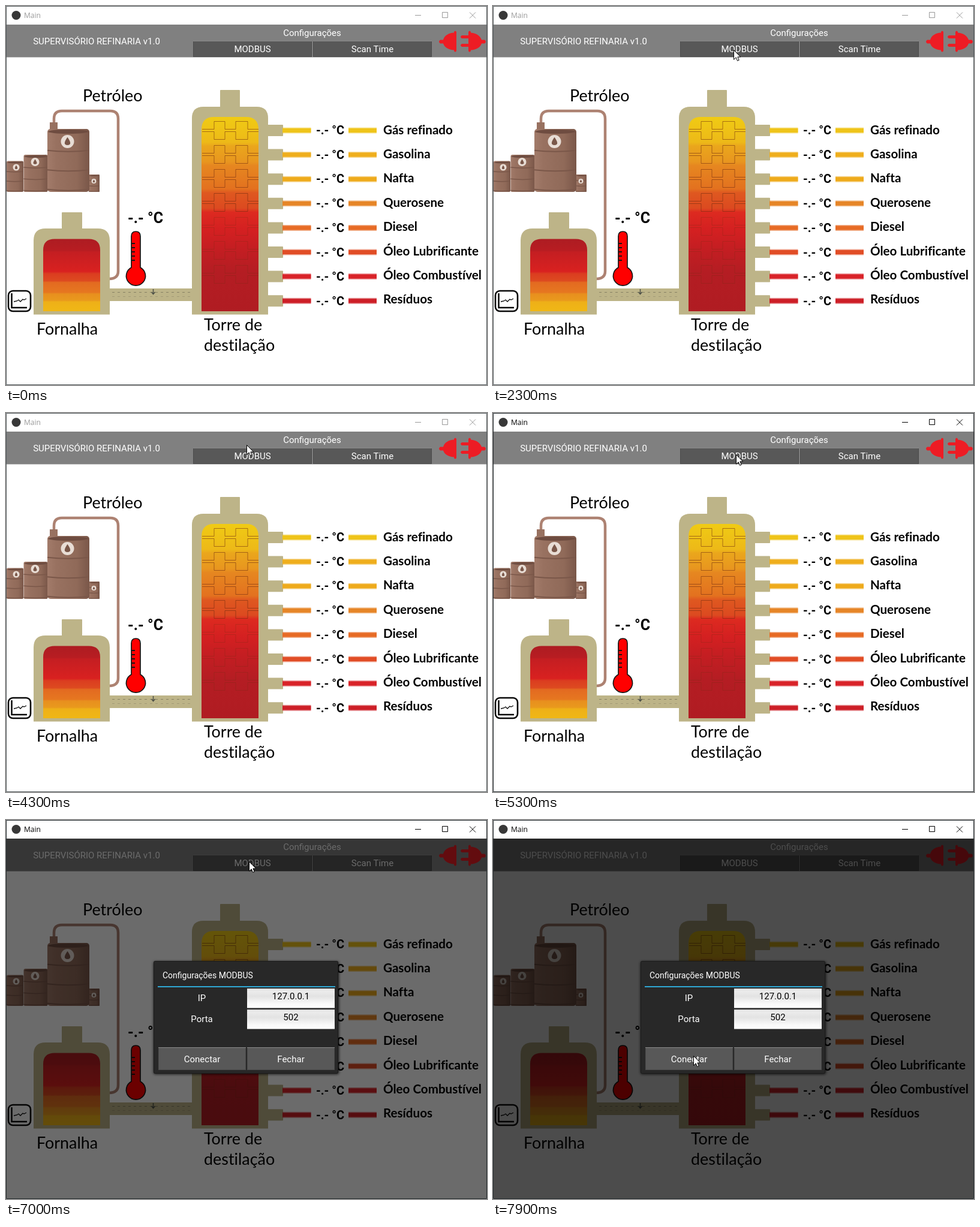
Recreate the animation shown at these times as an HTML page. Size 802x632 px, loop 8 s.

```html
<!DOCTYPE html>
<html lang="pt">
<head>
<meta charset="utf-8">
<title>Main</title>
<style>
  html, body { margin: 0; width: 100%; height: 100%; overflow: hidden; background: #fff; }
  svg { display: block; width: 802px; height: 632px; }
  .ui { font: 15px Roboto, sans-serif; fill: #fff; text-anchor: middle; }
  .caption { font: 26.9px Lato, sans-serif; font-variant-ligatures: none; }
  .product { font: bold 20.6px Lato, sans-serif; font-variant-ligatures: none; }
  .temp { font: bold 20px Roboto, sans-serif; }
</style>
</head>
<body>
<svg viewBox="0 0 802 632">
  <defs>
    <linearGradient id="towerHeat" x1="0" y1="0" x2="0" y2="1">
      <stop offset="0" stop-color="#f0cb14"/><stop offset=".13" stop-color="#edb918"/>
      <stop offset=".15" stop-color="#eaa61c"/><stop offset=".23" stop-color="#e8961f"/>
      <stop offset=".25" stop-color="#e68720"/><stop offset=".37" stop-color="#e3711f"/>
      <stop offset=".39" stop-color="#df5820"/><stop offset=".47" stop-color="#dc4a20"/>
      <stop offset=".49" stop-color="#dd2a20"/><stop offset=".58" stop-color="#d42021"/>
      <stop offset=".67" stop-color="#c51e22"/><stop offset=".8" stop-color="#b41d23"/>
      <stop offset="1" stop-color="#b01c22"/>
    </linearGradient>
    <linearGradient id="furnaceHeat" x1="0" y1="0" x2="0" y2="1">
      <stop offset="0" stop-color="#ad1c22"/><stop offset=".16" stop-color="#b81d22"/>
      <stop offset=".18" stop-color="#c41e22"/><stop offset=".45" stop-color="#d92120"/>
      <stop offset=".48" stop-color="#db3d20"/><stop offset=".58" stop-color="#dd4a20"/>
      <stop offset=".6" stop-color="#e36a21"/><stop offset=".74" stop-color="#e67720"/>
      <stop offset=".76" stop-color="#e88f1e"/><stop offset=".85" stop-color="#e9991d"/>
      <stop offset=".87" stop-color="#eeb018"/><stop offset="1" stop-color="#f0b715"/>
    </linearGradient>
    <linearGradient id="steel">
      <stop offset="0" stop-color="#a27b6a"/><stop offset=".22" stop-color="#987160"/>
      <stop offset=".7" stop-color="#906a59"/><stop offset="1" stop-color="#7a5749"/>
    </linearGradient>
    <linearGradient id="field" x1="0" y1="0" x2="0" y2="1">
      <stop offset="0" stop-color="#d9d9d9"/><stop offset=".12" stop-color="#ececec"/>
      <stop offset=".4" stop-color="#e3e3e3"/><stop offset=".8" stop-color="#fafafa"/>
      <stop offset="1" stop-color="#fff"/>
    </linearGradient>
    <filter id="shadow" x="-10%" y="-10%" width="120%" height="120%"><feGaussianBlur stdDeviation="2"/></filter>
  </defs>

  <rect width="802" height="632" fill="#fff"/>
  <circle cx="17" cy="15.5" r="7.5" fill="#383838"/>
  <g id="titleBar">
    <text x="30" y="20" style="font:12px 'Open Sans',sans-serif" fill="currentColor">Main</text>
    <path d="M682 15.5h10M727.5 10.5h9v9h-9zM773 10.5l10 10M783 10.5l-10 10" fill="none" stroke="currentColor"/>
  </g>

  <rect x="1" y="31" width="800" height="54.5" fill="#808080"/>
  <g class="ui">
    <text x="151" y="64">SUPERVISÓRIO REFINARIA v1.0</text>
    <text x="510.500" y="50">Configurações</text>
    <g id="menu"></g>
  </g>
  <g fill="#ed1c24">
    <path d="M724 56.500h5C731 49 738 45 747 44.500V43q2-3 4 0v32q-2 3-4 0V73.500C738 73 731 69 729 62.500h-5q-4-3 0-6z"/>
    <path d="M771 43q2-3 4 0v1.500C784 45 791 50 793 56.500h5q4 3 0 6h-5C791 69 784 73 775 73.500V75q-2 3-4 0v-7h-11q-4-2.500 0-5h11v-9h-11q-4-2.500 0-5h11z"/>
  </g>

  <path d="M80 200V188Q80 175 93 175H174Q187 175 187 188V442Q187 455 172 455" fill="none" stroke="#ad8272" stroke-width="4.500"/>
  <path d="M73 194h13v13h-13z" fill="#987160"/>
  <g id="barrels"></g>

  <g fill="#bdb488">
    <path d="M173 471H311V492H173z"/>
    <path d="M93 345q0-1 1-1h32q1 0 1 1V371H153Q173 371 173 391V514.500H46V391Q46 371 66 371H93z"/>
    <path d="M357 141q0-1 1-1h31q1 0 1 1V168H418Q437 168 437 187V514.500H310V187Q310 168 329 168H357z"/>
    <g id="nozzles"></g>
  </g>
  <path d="M62 509V407Q62 388.500 81 388.500H138Q157 388.500 157 407V509z" fill="url(#furnaceHeat)"/>
  <path d="M326 509V206Q326 185 347 185H400Q421 185 421 206V509z" fill="url(#towerHeat)"/>
  <g id="trays" fill="none" stroke="#702b10"></g>
  <path d="M177 477.500H308" stroke="#716c55" stroke-dasharray="4 5" opacity=".7"/>
  <path d="M177 484.500H308" stroke="#716c55" stroke-dasharray="4 5" opacity=".35"/>
  <path d="M245.500 472v8M242.500 477l3 3.500l3-3.500" stroke="#4e5148" stroke-width="1.500" fill="none"/>

  <g id="pipes"></g>
  <g class="caption">
    <text x="128" y="158.500">Petróleo</text>
    <text x="51" y="548">Fornalha</text>
    <text x="330" y="541">Torre de</text>
    <text x="330" y="575">destilação</text>
  </g>
  <text class="temp" x="203" y="362" style="font-size:25px">-.- °C</text>

  <path d="M209 436V384Q209 376 216.500 376T224 384V436A16 16 0 1 1 209 436z" fill="#f00" stroke="#151515" stroke-width="1.700"/>
  <path d="M209 396h6M209 403h6M209 410h6M209 417h6M209 424h6" stroke="#151515" stroke-width="2"/>
  <g fill="none" stroke="#080808">
    <rect x="4" y="475" width="37" height="34" rx="7.500" stroke-width="2.600"/>
    <path d="M9.500 479V503H35" stroke-width="2.500"/>
    <path d="M13 493l5-1l3-2l3 3l4-4l2 1l4-2" stroke-width="1.300"/>
  </g>

  <rect id="dim" x="1" y="31" width="800" height="600"/>
  <g id="popup">
    <rect x="246" y="236" width="309" height="188" rx="3" opacity=".75" filter="url(#shadow)"/>
    <rect x="246.500" y="235.500" width="307" height="187" rx="2" fill="#282828" stroke="#1b1b1b"/>
    <rect x="253" y="277" width="296" height="2" fill="#2fa7d4"/>
    <g class="ui">
      <text x="261" y="264" style="font-size:14px;text-anchor:start">Configurações MODBUS</text>
      <text x="326.500" y="302">IP</text>
      <text x="326.500" y="337">Porta</text>
      <rect x="402" y="281" width="146" height="32.500" fill="url(#field)"/>
      <rect x="402" y="316" width="146" height="32.500" fill="url(#field)"/>
      <text x="475" y="299" style="fill:#000">127.0.0.1</text>
      <text x="475" y="334" style="fill:#000">502</text>
      <g id="popupButtons"></g>
    </g>
  </g>
  <path id="frame" d="M.5 .5H801.500V631.500H.5z" fill="none"/>
  <path id="cursor" d="M.5 .5V16.300L4.200 12.800L6.600 18.400L9.200 17.300L6.900 11.900H11.700z" fill="#fff" stroke="#000"/>
</svg>
<script>
const LOOP = 8000, STEP = 100;
const el = id => document.getElementById(id);
const fill = (id, items, draw) => { el(id).innerHTML = items.map(draw).join(''); };

const button = ([label, x, y, w, h]) => `
  <rect x="${x}" y="${y}" width="${w}" height="${h}" fill="#585858"/>
  <path d="M${x} ${y + .5}h${w}" stroke="#8a8a8a"/>
  <path d="M${x + .5} ${y + h}v${1 - h}M${x + w - .5} ${y + h}v${1 - h}M${x} ${y + h - .5}h${w}" stroke="#4b4b4b"/>
  <text x="${x + w / 2}" y="${Math.round(y + h / 2 + 5.5)}">${label}</text>`;
fill('menu', [['MODBUS', 312, 58, 198, 27], ['Scan Time', 512, 58, 198, 27]], button);
fill('popupButtons', [['Conectar', 254, 379, 146, 38], ['Fechar', 402, 379, 146, 38]], button);

const barrel = ([x, y, w, cx, cy, r]) => {
  const h = 310 - y, band = k => `M${x} ${y + h * k}q${w / 2} ${w / 18} ${w} 0`;
  return `<rect x="${x}" y="${y}" width="${w}" height="${h}" rx="${w / 14}" fill="url(#steel)"/>
    <ellipse cx="${x + w / 2}" cy="${y + w / 20 + 1}" rx="${w / 2 - 1}" ry="${w / 20}" fill="#6e4c40"/>
    <path d="${band(.34)}${band(.65)}${band(.96)}" fill="none" stroke="#7a5749" stroke-width="${1 + w / 70}"/>
    <circle cx="${cx}" cy="${cy}" r="${r}" fill="#e8ddd5"/>
    <path d="M${cx} ${cy - r * .65}q${r * .85} ${r * 1.2} 0 ${r * 1.2}q${-r * .85} 0 0 ${-r * 1.2}" fill="#7a5749"/>`;
};
fill('barrels', [
  [138, 281, 18, 146.5, 292, 4], [1, 258.5, 28, 17, 269, 5.5],
  [29.5, 248, 40, 48.5, 260, 7], [69, 205, 70, 102.5, 226, 11]
], barrel);

const products = [
  ['Gás refinado', '#efc41a'], ['Gasolina', '#efae1c'], ['Nafta', '#eeaa1b'], ['Querosene', '#e68527'],
  ['Diesel', '#e76b25'], ['Óleo Lubrificante', '#e14d26'], ['Óleo Combustível', '#d92228'], ['Resíduos', '#cd1f27']
];
const rowY = i => 207.5 + i * 40.6;
fill('nozzles', products, (_, i) => `<rect x="436" y="${rowY(i) - 9.5}" width="26" height="19" rx="1"/>`);
fill('pipes', products, ([name, color], i) => {
  const line = `M461 ${rowY(i)}H508.5M571 ${rowY(i)}H618`;
  return `<path d="${line}" stroke="${color}" stroke-width="10" opacity=".5"/>
    <path d="${line}" stroke="${color}" stroke-width="7"/>
    <text class="temp" x="517" y="${214 + i * 40.7}">-.- °C</text>
    <text class="product" x="629" y="${213.5 + i * 40.4}">${name}</text>`;
});

const tray = (mid, tab) => `M327 ${mid}H347V${tab}H365V${mid}H383V${tab}H403V${mid}H421`;
fill('trays', products.slice(0, 7), (_, i) => {
  const y = 192.5 + i * 40;
  return `<path d="${tray(y + 13, y)}${tray(y + 17, y + 30)}" opacity="${i < 4 ? .55 : .28}"/>`;
});

// Pointer legs: start time, number of steps, destination.
const legs = [
  [800, 1, 150, 88], [900, 1, 150, 92], [1500, 3, 356, 142], [2000, 4, 401, 73],
  [3300, 1, 398, 74], [3400, 1, 401, 73], [3900, 2, 391, 62], [4100, 3, 401, 53],
  [4800, 4, 405, 69], [7300, 7, 334, 393]
];
const ease = k => k * k * (3 - 2 * k);

function pointerAt(t) {
  let x = 150, y = 88;
  for (const [start, steps, toX, toY] of legs) {
    if (t < start) break;
    const k = ease(Math.min(1, (Math.floor((t - start) / STEP) + 1) / steps));
    x += (toX - x) * k;
    y += (toY - y) * k;
  }
  return [Math.round(x), Math.round(y)];
}

const modbus = el('menu').querySelector('rect');

function render(t) {
  const active = t >= 5300;
  el('titleBar').style.color = active ? '#000' : '#999';
  el('frame').setAttribute('stroke', active ? '#22282b' : '#51575a');
  modbus.setAttribute('fill', t >= 6800 && t < 7000 ? '#32a4ce' : '#585858');
  el('dim').setAttribute('opacity', t < 7000 ? 0 : t < 7100 ? .58 : .7);
  el('popup').style.display = t < 7000 ? 'none' : '';
  el('cursor').style.display = t < 800 ? 'none' : '';
  el('cursor').setAttribute('transform', `translate(${pointerAt(t)})`);
}

function tick() {
  render(performance.now() % LOOP);
  requestAnimationFrame(tick);
}
tick();
</script>
</body>
</html>
```
